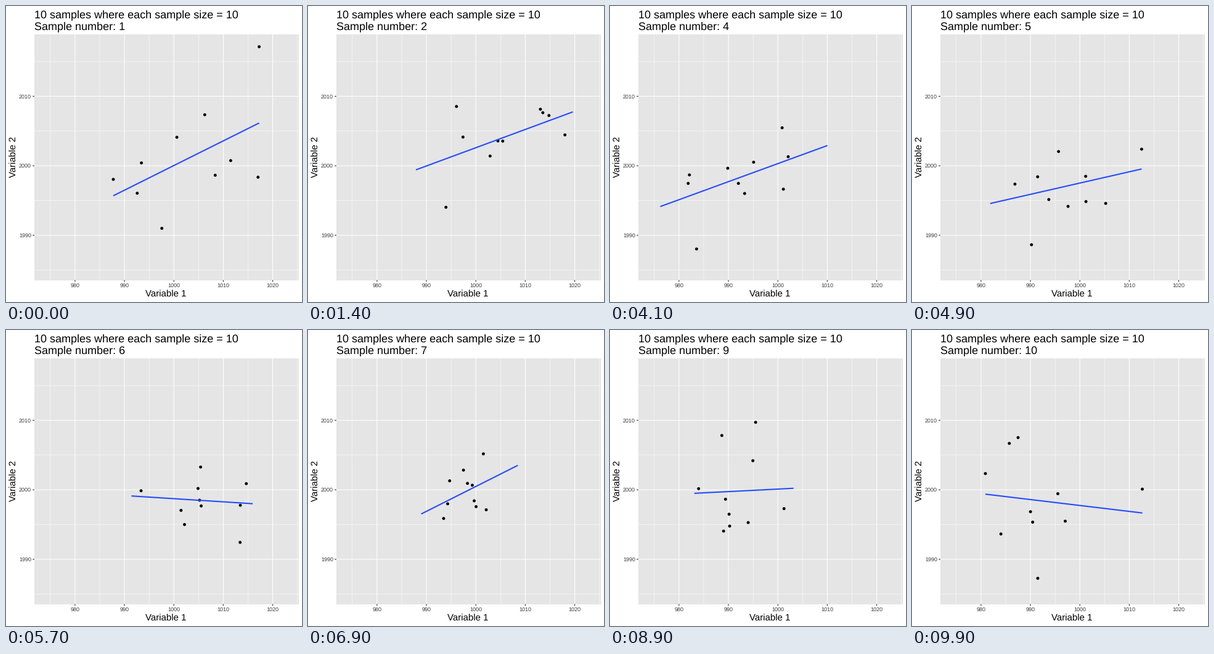
Animation, 480 px wide and 480 px high, one loop 10 s. Source, as a matplotlib script:

```python
import numpy as np
import matplotlib.pyplot as plt
from matplotlib.animation import FuncAnimation

SIZE, DPI = 480, 72          # at 72 dpi one point is one pixel
STEPS = 11                   # frames from one sample to the next
COUNT = 10                   # points in a sample
LEFT, RIGHT, TOP, BOTTOM = 46, 474.5, 46, 444.5

plt.rcParams["font.family"] = ["Liberation Sans", "DejaVu Sans"]
plt.rcParams["text.hinting"] = "none"

# Both ends of each sample's fitted line (x0, y0, x1, y1), in pixels
fits = np.array([
    (174, 307.7, 410.5, 189.7),
    (172, 294.2, 455, 156.7),
    (183, 189.7, 361.5, 211.7),
    (123, 217.2, 392, 193.1),
    (66, 365.7, 337.7, 238.7),
    (200, 265.7, 414, 295),
    (219, 284.7, 337, 221.7),
    (89, 334.7, 349, 213.5),
    (138.5, 264.7, 290, 252.7),
    (119, 266.2, 373.5, 296.7),
])
spreads = [65, 50, 30, 55, 50, 38, 30, 50, 65, 65]


def scatter_about(fit, spread, rng):
    """Random points whose least-squares line is exactly the given fit."""
    x0, y0, x1, y1 = fit
    x = rng.normal(size=COUNT)
    x = np.interp(x, (x.min(), x.max()), (x0, x1))
    noise = rng.normal(size=COUNT)
    noise -= np.polyval(np.polyfit(x, noise, 1), x)
    y = np.interp(x, (x0, x1), (y0, y1)) + noise * spread / noise.std()
    return np.column_stack([x, y])


rng = np.random.default_rng(10)
points = np.array([scatter_about(f, s, rng) for f, s in zip(fits, spreads)])
FRAMES = STEPS * (len(fits) - 1) + 1

fig = plt.figure(figsize=(SIZE / DPI, SIZE / DPI), dpi=DPI, facecolor="white")
ax = fig.add_axes([0, 0, 1, 1])
ax.set(xlim=(0, SIZE), ylim=(SIZE, 0))
ax.axis("off")


def to_x(value):
    return 272.2 + 8.015 * (value - 1000)


def to_y(value):
    return 259.1 - 11.27 * (value - 2000)


def rule(x, y, color, width):
    ax.plot(x, y, color=color, lw=width, solid_capstyle="butt", snap=False)


def label(x, y, text, size, ha="center", color="black", **kw):
    return ax.text(x, y, text, fontsize=size, ha=ha, va="baseline",
                   color=color, **kw)


def grid(x_values, y_values, width):
    for v in x_values:
        rule([to_x(v)] * 2, [TOP, BOTTOM], "white", width)
    for v in y_values:
        rule([LEFT, RIGHT], [to_y(v)] * 2, "white", width)


ax.add_patch(plt.Rectangle((LEFT, TOP), RIGHT - LEFT, BOTTOM - TOP,
                           color="#e5e5e5", lw=0))
x_ticks, y_ticks = range(980, 1021, 10), range(1990, 2011, 10)
grid(range(975, 1026, 10), range(1985, 2016, 10), 0.53)
grid(x_ticks, y_ticks, 1.07)

for v in x_ticks:
    rule([to_x(v)] * 2, [BOTTOM, BOTTOM + 2.7], "#222222", 1.07)
    label(to_x(v), 456.3, str(v), 9, color="#3c3c3c")
for v in y_ticks:
    rule([LEFT - 2.7, LEFT], [to_y(v)] * 2, "#222222", 1.07)
    label(41, to_y(v) + 3.2, str(v), 9, ha="right", color="#3c3c3c")

label(259.4, 472, "Variable 1", 15)
label(17, 244.6, "Variable 2", 15, rotation=90, rotation_mode="anchor")
label(46, 19, "10 samples where each sample size = 10", 18, ha="left")
counter = label(46, 38, "", 18, ha="left")

# One size per dot keeps their positions unrounded
dots = ax.scatter(*points[0].T, s=[24] * COUNT, c="black", linewidths=0,
                  zorder=3)
line, = ax.plot([], [], color="#264dff", lw=2.13, solid_capstyle="butt",
                snap=False, zorder=4)


def blend(states, frame):
    i, step = divmod(frame, STEPS)
    j = min(i + 1, len(states) - 1)
    return states[i] + (states[j] - states[i]) * step / STEPS


def draw(frame):
    dots.set_offsets(blend(points, frame))
    x0, y0, x1, y1 = blend(fits, frame)
    line.set_data([x0, x1], [y0, y1])
    counter.set_text(f"Sample number: {1 + frame // STEPS}")
    return dots, line, counter


anim = FuncAnimation(fig, draw, frames=FRAMES, interval=100, repeat=True,
                     repeat_delay=0)
plt.show()
```
